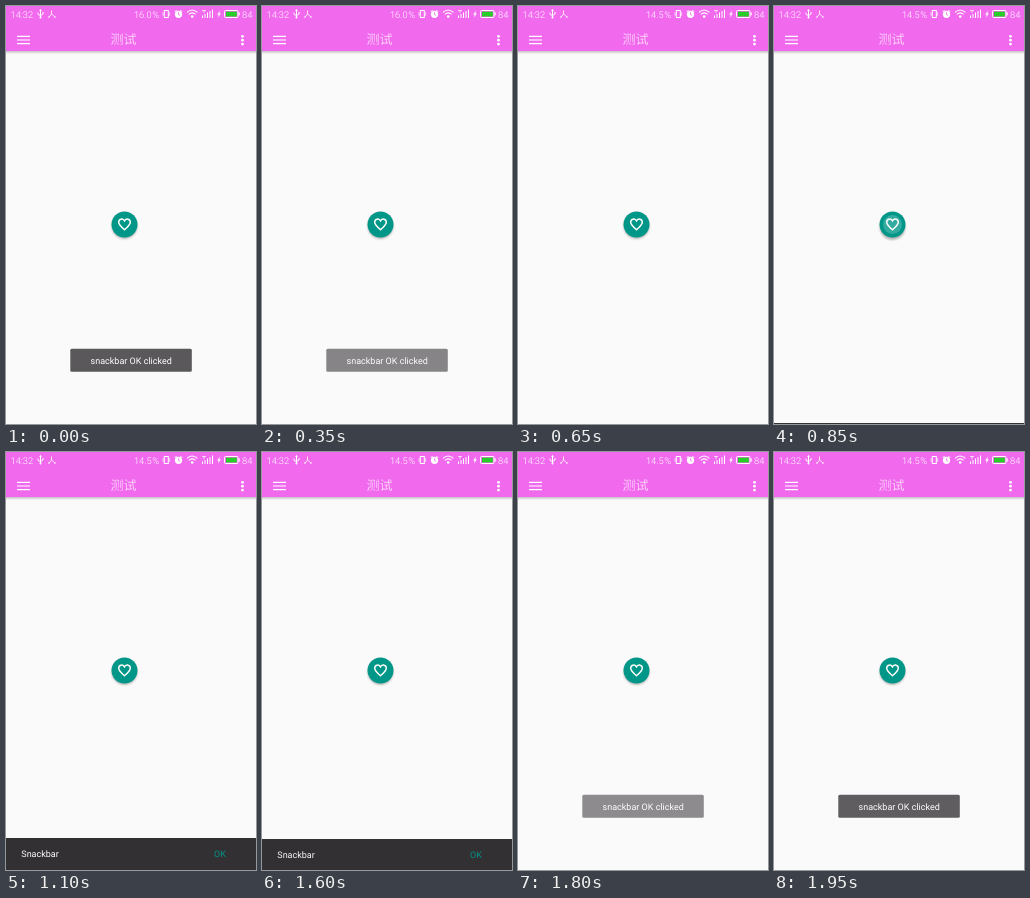
Write an HTML page that moves like this. It is 250 px wide and 418 px high and loops after 2250 ms.

```html
<!DOCTYPE html>
<html lang="zh">
<head>
<meta charset="utf-8">
<style>
  html, body { margin: 0; width: 100%; height: 100%; overflow: hidden; background: #fafafa; }
  svg { display: block; width: 250px; height: 418px; }
  text { font: 9px Roboto, sans-serif; fill: #fff; text-rendering: geometricPrecision; }
  .status text { font-size: 9.3px; font-weight: 300; }
  .title { font: 300 13px "Noto Sans CJK SC", "Noto Sans CJK", sans-serif; stroke: #f16aee; stroke-width: .3; }
  .line { fill: none; stroke: #fff; }
</style>
</head>
<body>
<svg viewBox="0 0 250 418">
  <defs>
    <linearGradient id="drop" x2="0" y2="1">
      <stop offset="0" stop-color="#c4bec4"/>
      <stop offset="1" stop-color="#fafafa"/>
    </linearGradient>
    <filter id="blur" x="-50%" y="-50%" width="200%" height="200%">
      <feGaussianBlur stdDeviation="1.2"/>
    </filter>
    <clipPath id="disc"><circle cx="118.5" cy="218.5" r="13"/></clipPath>
  </defs>

  <rect width="250" height="418" fill="#fafafa"/>
  <rect y="45" width="250" height="3" fill="url(#drop)"/>
  <rect width="250" height="45" fill="#f16aee"/>

  <g class="status">
    <text x="4.6" y="11.5">14:32</text>
    <text id="load" x="127.9" y="11.5"></text>
    <text x="146.2" y="11.5">%</text>
    <text x="236.1" y="11.5">84</text>
    <g class="line">
      <path d="M34.5 4V12M32 6.5V8.3L34.5 9.8M37 6V8L34.5 9.5"/>
      <path d="M45.5 4.5V8L43 11M45.5 8L49 11" stroke-width=".8"/>
      <rect x="158.3" y="4.5" width="4" height="7"/>
      <path d="M157 6.3V9.7M163.6 6.3V9.7" stroke-width=".7"/>
      <path d="M181 6.4Q186.2 1.6 191.4 6.4M182.9 8.4Q186.2 5.4 189.5 8.4" stroke-width="1.1"/>
      <path d="M196.5 12V9.5M199 12V8M201.5 12V6.5M204 12V5M206.5 12V3.5"/>
      <path d="M196 4.5H200M198 4.5V7" stroke-width=".7"/>
      <rect x="218.5" y="4.5" width="13.5" height="7" rx="1"/>
    </g>
    <g fill="#fff">
      <path d="M33.1 5L34.5 2.7L35.9 5Z"/>
      <circle cx="34.5" cy="11.5" r="1.1"/>
      <circle cx="43" cy="11" r=".8"/>
      <circle cx="49" cy="11" r=".8"/>
      <circle cx="172.5" cy="8.3" r="3.6"/>
      <path d="M168.4 5.5L170.5 3.7L171 4.3L169 6ZM176.6 5.5L174.5 3.7L174 4.3L176 6Z"/>
      <circle cx="186.2" cy="10.6" r="1.3"/>
      <path d="M214 4.5L211.2 8.6H212.7L212 11.5L214.9 7.4H213.3Z"/>
      <rect x="232.5" y="6.5" width="1.2" height="3"/>
    </g>
    <path d="M172.5 6.3V8.5L174 9.5" fill="none" stroke="#f16aee" stroke-width=".8"/>
    <rect x="220" y="5.7" width="10.8" height="4.8" fill="#25cf25"/>
  </g>

  <!-- toolbar -->
  <path class="line" d="M11 30.4H24M11 34H24M11 37.6H24" stroke-width="1.2"/>
  <text class="title" x="104.6" y="38">测试</text>
  <g fill="#fff">
    <circle cx="236.5" cy="30.3" r="1.4"/>
    <circle cx="236.5" cy="34.2" r="1.4"/>
    <circle cx="236.5" cy="38.1" r="1.4"/>
  </g>

  <!-- round button -->
  <circle id="shade" cx="118.5" r="12.7" fill="#000" opacity=".3" filter="url(#blur)"/>
  <circle cx="118.5" cy="218.5" r="13" fill="#009688"/>
  <circle id="ripple" cx="118.5" cy="218.5" fill="#fff" clip-path="url(#disc)"/>
  <path class="line" stroke-width="1.5" d="M118.5 223.8C114.5 220.3 112.7 218.6 112.7 216.3
    C112.7 212.9 116.6 212 118.5 214.8C120.4 212 124.3 212.9 124.3 216.3
    C124.3 218.6 122.5 220.3 118.5 223.8Z"/>

  <g id="snack">
    <rect y="386" width="250" height="34" fill="#323032"/>
    <g id="label">
      <text x="15.3" y="405.2">Snackbar</text>
      <text x="208" y="405.2" style="fill:#009688">OK</text>
    </g>
  </g>

  <g id="toast">
    <rect x="64.3" y="342.8" width="121.5" height="23" rx="1.5" fill="#5a585a"/>
    <text x="125.2" y="358" text-anchor="middle">snackbar OK clicked</text>
  </g>
</svg>
<script>
const LOOP = 2250, STEP = 50, BAR = 32;
const $ = id => document.getElementById(id);
const clamp = v => Math.min(1, Math.max(0, v));
const span = (t, from, length) => clamp((t - from) / length);

// cubic-bezier(.4, 0, .2, 1), solved by bisection
function ease(x) {
  let lo = 0, hi = 1;
  for (let i = 0; i < 20; i++) {
    const s = (lo + hi) / 2, r = 1 - s;
    if (1.2 * s * r * r + .6 * s * s * r + s ** 3 < x) lo = s; else hi = s;
  }
  return 3 * lo * lo - 2 * lo ** 3;
}

function toastAlpha(t) {
  if (t < 250) return 1;
  if (t < 1600) return 1 - span(t, 240, 395);
  return 1.06 * (1 - (1 - span(t, 1600, 500)) ** 2);
}

function draw(time) {
  const t = Math.floor((time % LOOP) / STEP) * STEP;
  const enter = span(t, 830, 250);
  const leave = t < 1600 ? 0 : span(t, 1570, 250);
  const drop = Math.round(BAR * (1 - ease(enter) + ease(leave)));
  $("snack").setAttribute("transform", `translate(0 ${drop})`);
  $("label").setAttribute("opacity", span(t, 900, 180) * (1 - span(leave, .1, .6)));
  $("toast").setAttribute("opacity", clamp(toastAlpha(t)));
  $("load").textContent = t < 500 ? "16.0" : "14.5";

  const press = t < 800 ? 0 : span(t, 775, 75) * (1 - span(t, 900, 200));
  $("ripple").setAttribute("r", 5 + 9 * span(t, 775, 150));
  $("ripple").setAttribute("opacity", .2 * press);
  $("shade").setAttribute("cy", 220 + press);
}

const start = performance.now();
function tick(now) {
  draw(Math.max(0, now - start));
  requestAnimationFrame(tick);
}
draw(0);
requestAnimationFrame(tick);
</script>
</body>
</html>
```
